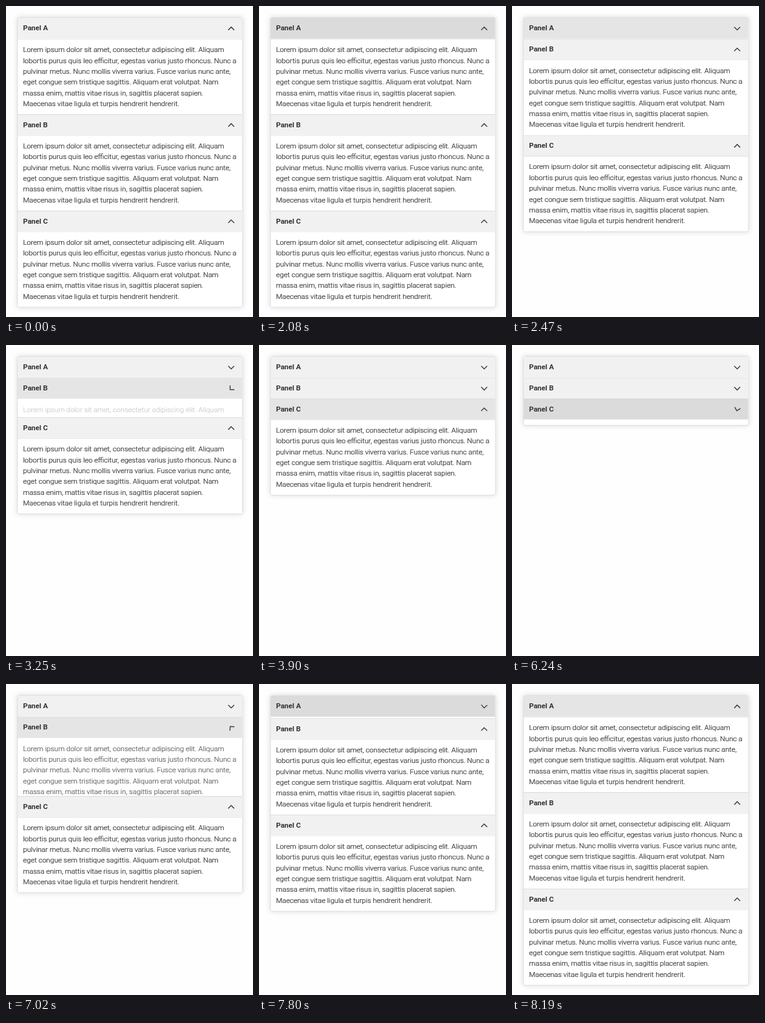
Write an HTML page that moves like this. It is 398 px wide and 500 px high and loops after 9.62 s.

```html
<!DOCTYPE html>
<html lang="en">
<head>
<meta charset="utf-8">
<title>Collapsible panels</title>
<style>
@property --open { syntax: "<number>"; inherits: true; initial-value: 1; }

html, body { margin: 0; width: 100%; height: 100%; overflow: hidden; background: #fefefe; }

/* laid out at double density, then scaled down */
.group {
  --line: #d9d9d9;
  position: absolute; left: 18px; top: 18.4px; width: 880px; box-sizing: border-box;
  transform: scale(.413); transform-origin: 0 0;
  border: 2px solid var(--line); border-radius: 8px; overflow: hidden; background: #fff;
  box-shadow: 0 0 24px rgba(0, 0, 0, .14);
  font: 300 28px/42px Roboto, sans-serif; color: #333;
}
.panel { animation: 9620ms ease infinite; }

.head {
  position: relative; height: 81px; padding: 0 21px;
  font-weight: 600; line-height: 82px; background: #f1f1f1;
  animation: 9620ms linear infinite;
}
.a .head { height: 82px; }
.panel + .panel .head { box-shadow: inset 0 2px var(--line); }
.head svg {
  position: absolute; right: 27px; top: 26px; width: 32px; height: 32px;
  fill: none; stroke: #404040; stroke-width: 1.8;
  transform: rotate(calc((var(--open) - 1) * 180deg));
}
.fold { height: calc(var(--open) * 294px); overflow: hidden; }
.body {
  padding: 20px 21px; border-top: 2px solid var(--line);
  white-space: nowrap; opacity: var(--open);
  -webkit-text-stroke: .6px;
}

.a { animation-name: fold-a; }
.b { animation-name: fold-b; }
.c { animation-name: fold-c; }
.a .head { animation-name: tint-a; }
.b .head { animation-name: tint-b; }
.c .head { animation-name: tint-c; }

@keyframes fold-a {
  0%, 21.622% { --open: 1; }
  24.74%, 80.977% { --open: 0; }
  84.096%, 100% { --open: 1; }
}
@keyframes fold-b {
  0%, 32.38% { --open: 1; }
  35.499%, 71.507% { --open: 0; }
  74.626%, 100% { --open: 1; }
}
@keyframes fold-c {
  0%, 47.245% { --open: 1; }
  50.364%, 64.605% { --open: 0; }
  67.723%, 100% { --open: 1; }
}

/* idle #f1f1f1, hover #e5e5e5, pressed #dbdbdb */
@keyframes tint-a {
  0%, 20.3% { background: #f1f1f1; }
  21.5%, 22% { background: #dbdbdb; }
  24%, 31% { background: #e5e5e5; }
  32.3%, 78.5% { background: #f1f1f1; }
  79.5%, 80.3% { background: #e5e5e5; }
  81%, 81.5% { background: #dbdbdb; }
  83.5%, 99.99% { background: #e5e5e5; }
  100% { background: #f1f1f1; }
}
@keyframes tint-b {
  0%, 31% { background: #f1f1f1; }
  32.3%, 38.5% { background: #e5e5e5; }
  40.3%, 69% { background: #f1f1f1; }
  70.2%, 78.5% { background: #e5e5e5; }
  79.5%, 100% { background: #f1f1f1; }
}
@keyframes tint-c {
  0%, 38.5% { background: #f1f1f1; }
  40.3%, 46.5% { background: #e5e5e5; }
  47.2%, 47.7% { background: #dbdbdb; }
  49.7%, 64% { background: #e5e5e5; }
  64.6%, 65% { background: #dbdbdb; }
  67%, 69% { background: #e5e5e5; }
  70.2%, 100% { background: #f1f1f1; }
}
</style>
</head>
<body>
<div class="group"></div>
<script>
const lines = [
  "Lorem ipsum dolor sit amet, consectetur adipiscing elit. Aliquam",
  "lobortis purus quis leo efficitur, egestas varius justo rhoncus. Nunc a",
  "pulvinar metus. Nunc mollis viverra varius. Fusce varius nunc ante,",
  "eget congue sem tristique sagittis. Aliquam erat volutpat. Nam",
  "massa enim, mattis vitae risus in, sagittis placerat sapien.",
  "Maecenas vitae ligula et turpis hendrerit hendrerit."
];

const panel = name => `
  <div class="panel ${name.toLowerCase()}">
    <div class="head">Panel ${name}
      <svg viewBox="0 0 16 16"><path d="M2.2 11 8 5.2 13.8 11"/></svg>
    </div>
    <div class="fold"><div class="body">${lines.join("<br>")}</div></div>
  </div>`;

document.querySelector(".group").innerHTML = ["A", "B", "C"].map(panel).join("");
</script>
</body>
</html>
```
